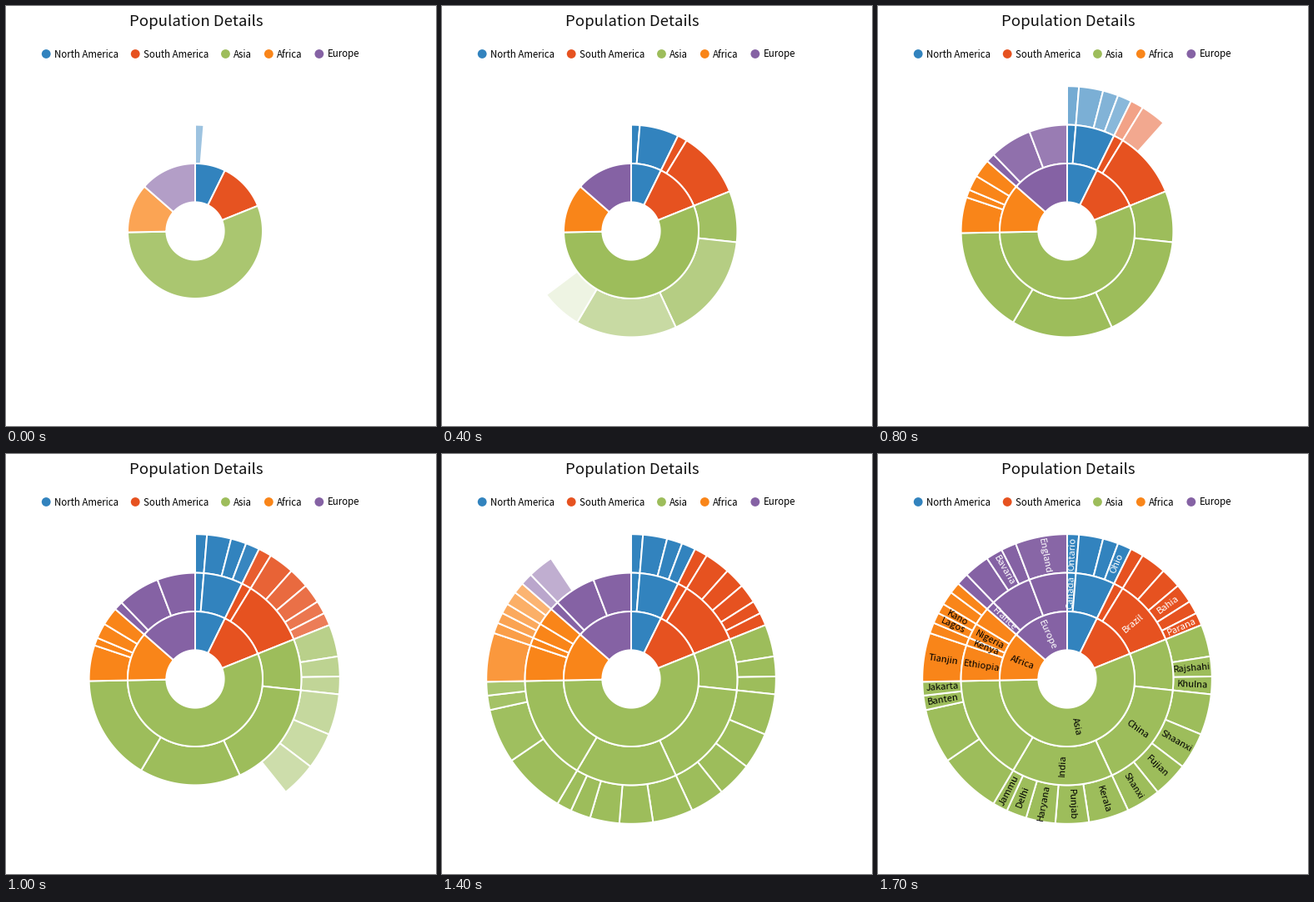
These frames come from a looping animation (516x504 px, 2100 ms). A matplotlib script:

```python
import numpy as np
import matplotlib.pyplot as plt
from matplotlib.animation import FuncAnimation
from matplotlib.colors import to_rgb
from matplotlib.patches import Circle, Polygon

W, H, DPI = 516, 504, 64
PX = 72 / DPI  # points per pixel
CX, CY = 227, 270
HOLE, BAND = 34.6, 46.4
STEP_MS, FRAMES, LAST = 100, 21, 17
SWEEP = 57.1  # degrees per frame in the middle ring

plt.rcParams["font.family"] = ["Noto Sans CJK JP", "DejaVu Sans"]

# (region, colour, label colour, [(country, [(state, share), ...]), ...])
# Only the named countries and states carry a label.
DATA = [
    ("North America", "#3283be", "white", [
        ("Canada", [("Ontario", 4.7)]),
        ("", [("", 9.7), ("", 6.2), ("Ohio", 5.6)]),
    ]),
    ("South America", "#e65220", "white", [
        ("", [("", 5.3)]),
        ("Brazil", [("", 10.2), ("", 8.2), ("Bahia", 7.8), ("", 5.3),
                    ("Parana", 5.1)]),
    ]),
    ("Asia", "#9dbd5b", "black", [
        ("", [("", 12.9), ("Rajshahi", 8), ("Khulna", 7.1)]),
        ("China", [("", 16.4), ("Shaanxi", 14.7), ("Fujian", 14.1),
                   ("Shanxi", 13.8)]),
        ("India", [("Kerala", 16.2), ("Punjab", 13.4), ("Haryana", 11.8),
                   ("Delhi", 8.1), ("Jammu", 6)]),
        ("", [("", 25.1), ("", 21.9), ("Banten", 5.8), ("Jakarta", 5.5)]),
    ]),
    ("Africa", "#f98519", "black", [
        ("Ethiopia", [("Tianjin", 19.6)]),
        ("Kenya", [("", 4.3)]),
        ("Nigeria", [("Lagos", 4.3), ("Kano", 4.1)]),
        ("", [("", 5.5), ("", 4.5)]),
    ]),
    ("Europe", "#8562a4", "white", [
        ("France", [("", 4.9)]),
        ("", [("", 10.3), ("Bavaria", 6.7), ("", 6.1)]),
        ("", [("England", 20.8)]),
    ]),
]


def polar(r, deg):
    a = np.radians(deg)
    return CX + r * np.sin(a), CY - r * np.cos(a)


def sector(ring, a0, a1):
    r0 = HOLE + BAND * ring
    a = np.linspace(a0, a1, int(a1 - a0) + 3)
    return np.vstack([np.column_stack(polar(r0 + BAND, a)),
                      np.column_stack(polar(r0, a[::-1]))])


def tint(color, strength):
    return tuple(1 - strength * (1 - c) for c in to_rgb(color))


def done_at(ring, k, a1):
    """Frame at which segment k of a ring is fully swept out."""
    if ring == 0:
        return k / 1.6 - 3.2
    if ring == 1:
        return (a1 - 4.7) / SWEEP
    return 7 + 0.175 * k + 0.00095 * k * k


class Segment:
    counts = [0, 0, 0]

    def __init__(self, ring, a0, a1, color, ink, name):
        self.ring, self.a0, self.a1, self.color = ring, a0, a1, color
        self.done = done_at(ring, Segment.counts[ring], a1)
        Segment.counts[ring] += 1
        self.patch = ax.add_patch(Polygon(
            sector(ring, a0, a1), closed=True, fc=color, ec="white",
            lw=2 * PX, joinstyle="miter", zorder=4 - ring))
        mid = (a0 + a1) / 2
        x, y = polar(HOLE + BAND * (ring + 0.5), mid)
        self.label = ax.text(
            x, y, name, size=11.2 * PX, color=ink, ha="center", va="center",
            rotation=90 - mid if mid < 180 else 270 - mid,
            rotation_mode="anchor", zorder=6)

    def draw(self, i):
        age = i - self.done
        end = self.a1
        strength = min(1, 0.48 + 0.2 * age)
        if age < -1e-9:
            # only the middle ring shows a segment while it is still growing
            end = min(end, self.a1 + age * SWEEP) if self.ring == 1 else self.a0
            strength = 0.17
        self.patch.set_visible(end > self.a0)
        if end > self.a0:
            self.patch.set_xy(sector(self.ring, self.a0, end))
            self.patch.set_facecolor(tint(self.color, strength))
        self.label.set_visible(i >= LAST)


def build_segments():
    total = sum(share for *_, countries in DATA
                for _, states in countries for _, share in states)
    segments, angle = [], 0
    for region, color, ink, countries in DATA:
        region_start = angle
        for country, states in countries:
            country_start = angle
            for state, share in states:
                start, angle = angle, angle + 360 * share / total
                segments.append(Segment(2, start, angle, color, ink, state))
            segments.append(
                Segment(1, country_start, angle, color, ink, country))
        # narrow regions have no room for their name
        name = region if " " not in region else ""
        segments.append(Segment(0, region_start, angle, color, ink, name))
    return segments


def draw_legend():
    renderer = fig.canvas.get_renderer()
    x = 48.2
    for name, color, *_ in DATA:
        ax.add_patch(Circle((x, 57.5), 5.4, fc=color, ec="none"))
        text = ax.text(x + 10, 61.5, name, size=11.5 * PX, color="black")
        x += 30 + text.get_window_extent(renderer).width


fig = plt.figure(figsize=(W / DPI, H / DPI), dpi=DPI, facecolor="white")
ax = fig.add_axes([0, 0, 1, 1])
ax.set_xlim(0, W)
ax.set_ylim(H, 0)
ax.axis("off")

ax.text(148.5, 24, "Population Details", size=18.6 * PX, color="#111111")
draw_legend()
segments = build_segments()


def draw(i):
    for segment in segments:
        segment.draw(i)
    return [s.patch for s in segments] + [s.label for s in segments]


anim = FuncAnimation(fig, draw, frames=FRAMES, interval=STEP_MS,
                     init_func=lambda: draw(0), repeat=True, repeat_delay=0)
plt.show()
```
